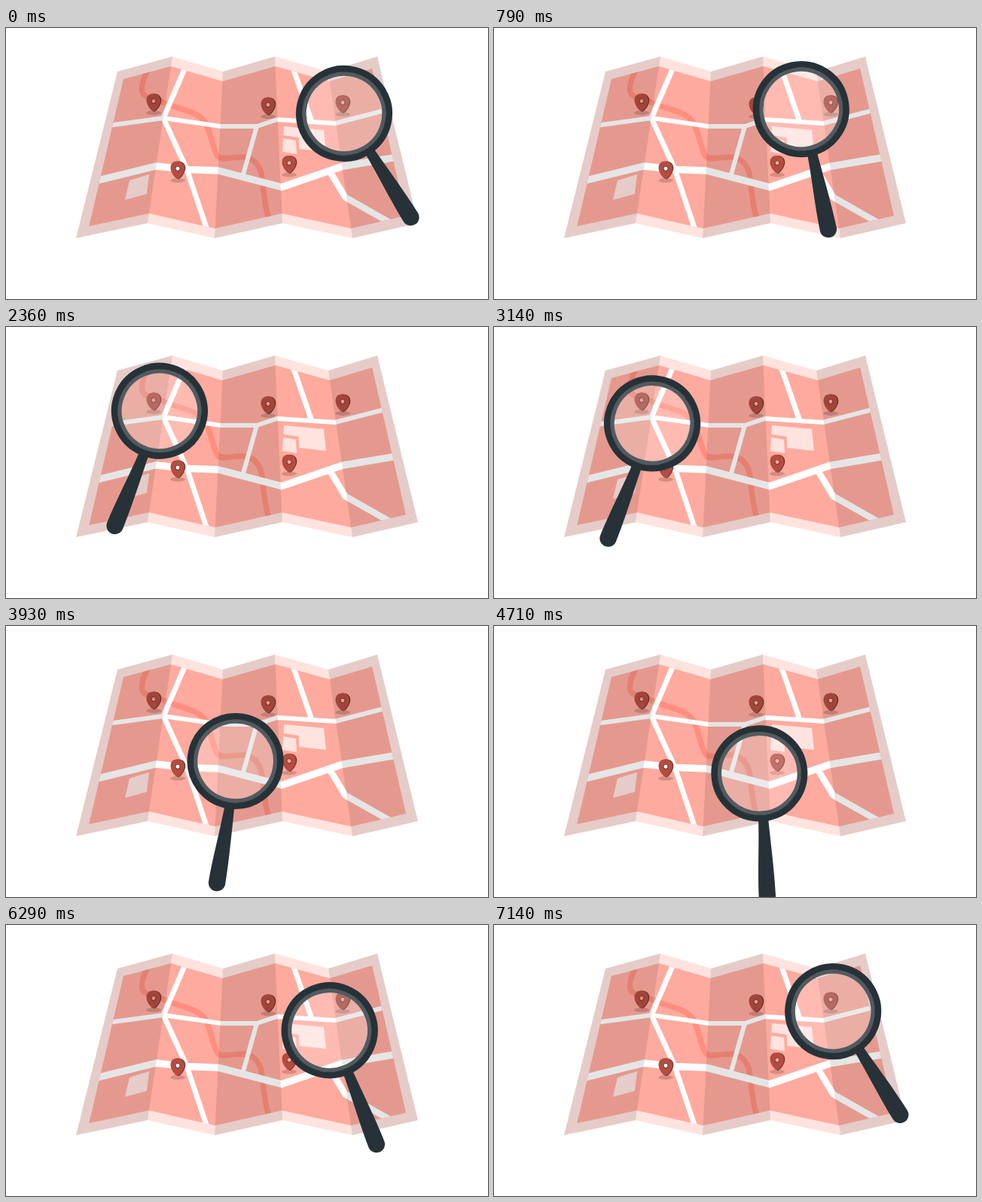
These frames come from a looping animation (640x361 px, 7.21 s). An HTML page:

```html
<!DOCTYPE html>
<html lang="en">
<head>
<meta charset="utf-8">
<title>Map search</title>
<style>
  html, body { margin: 0; width: 100%; height: 100%; overflow: hidden; background: #fff; }
  svg { display: block; width: 100%; height: 100%; }
  .road { fill: none; stroke: #fff; stroke-linejoin: round; }
</style>
</head>
<body>
<svg viewBox="0 0 640 361">
  <defs>
    <clipPath id="printed"><path id="inner"/></clipPath>
    <g id="pin">
      <ellipse cy="1.500" rx="10" ry="3" fill="#000" opacity=".17"/>
      <path fill="#742f27" fill-rule="evenodd" d="M1 0C-3 -2 -8.500 -9 -8.500 -15C-8.500 -21 -5 -24 .8 -24C7 -24 10.300 -20 10.300 -15C10.300 -9 5 -2 1 0ZM0 -16.800a2.500 2.600 0 1 0 .01 0Z"/>
      <path fill="#b34d41" fill-rule="evenodd" d="M-.5 -.5C-4 -2 -9.500 -9 -9.500 -15C-9.500 -21 -6 -24 -.2 -24C5.500 -24 9 -20 9 -15C9 -9 4 -2 -.5 -.5ZM0 -17.600a3.400 3.600 0 1 0 .01 0Z"/>
    </g>
  </defs>

  <path id="sheet" fill="#ffe3df"/>
  <use href="#inner" fill="#ffaa9e"/>

  <g clip-path="url(#printed)">
    <path fill="none" stroke="#ff8e7e" stroke-width="7.500" d="M189 54C183 66 179 78 181 85C183 94 196 92 207 98C226 108 254 110 264 125C273 140 273 158 281 171C287 177 302 171 316 172C332 174 338 186 340 199C342 216 343 239 350 256"/>
    <path fill="#ffe3df" d="M164 203 190 195 187 221 158 229ZM369 131 422 136 425 165 389.500 161 388.500 146 368.500 143ZM368 147 385 150 386 168 367 165Z"/>
    <g class="road">
      <path stroke-width="6" d="M135 130 209 120 285 131H333L360 122 437 127 506 109M333 131 315 195"/>
      <path stroke-width="7" d="M239 50 209 120 240 188 268 272M380 50 406 125"/>
      <path stroke-width="9.500" d="M118 204 199 184 241 188.500 282 190 366 212 446 184.500 520 172"/>
      <path stroke-width="8.500" d="M431 193 450.500 225.500 513 261"/>
    </g>
  </g>

  <use href="#pin" x="196" y="111.500"/>
  <use href="#pin" x="348" y="116.500"/>
  <use href="#pin" x="447" y="113.500"/>
  <use href="#pin" x="228" y="201.500"/>
  <use href="#pin" x="376" y="194"/>

  <path id="shade" opacity=".1"/>

  <g id="glass">
    <circle r="51" fill="#fff" opacity=".2"/>
    <circle r="53" fill="none" stroke="#515b60" stroke-width="5.500"/>
    <path fill="#263238" d="M-4.500 60H8.500C10 90 13 130 13 164A11.200 11.200 0 0 1 -9.400 164C-9.400 135 -5 90 -4.500 60Z"/>
    <circle r="59.700" fill="none" stroke="#263238" stroke-width="8.600"/>
  </g>
</svg>
<script>
const byId = id => document.getElementById(id);
const mix = (a, b, k) => a + (b - a) * k;

// The sheet is a zigzag of folds; u counts folds from the left, v runs from top to bottom.
const foldTop = [148, 221, 288, 357, 428, 493];
const foldBottom = [93, 188, 277, 367, 460, 547];

function onSheet(u, v) {
  const i = Math.min(Math.floor(u), 4), k = u - i;
  const x = mix(mix(foldTop[i], foldTop[i + 1], k), mix(foldBottom[i], foldBottom[i + 1], k), v);
  const zigzag = 20 * (i % 2 ? k : 1 - k);
  return `${x} ${38 + zigzag + 222 * v}`;
}

function strip(us, inset = 0) {
  const top = us.map(u => onSheet(u, inset));
  const bottom = us.map(u => onSheet(u, 1 - inset)).reverse();
  return `M${[...top, ...bottom].join('L')}Z`;
}

byId('sheet').setAttribute('d', strip([0, 1, 2, 3, 4, 5]));
byId('inner').setAttribute('d', strip([0.15, 1, 2, 3, 4, 4.85], 0.058));
byId('shade').setAttribute('d', [0, 2, 4].map(i => strip([i, i + 1])).join(''));

// Evenly timed poses of the glass: lens x, lens y, tilt in degrees
const LOOP = 7210;
const poses = [
  [449, 114, 32], [406.5, 108, 11.8], [248, 104, -13.6],
  [203, 112.5, -22], [214, 131, -21], [312, 183.5, -8],
  [355.5, 197, 4.5], [362.5, 194.3, 16.3], [438, 133, 22.7],
];

// Closed Catmull-Rom curve through the poses
function poseAt(time) {
  const n = poses.length, place = time / LOOP * n;
  const i = Math.floor(place), k = place - i;
  const [before, from, to, after] = [-1, 0, 1, 2].map(step => poses[(i + step + n) % n]);
  return from.map((a, j) => {
    const b = to[j], start = (b - before[j]) / 2, end = (after[j] - a) / 2;
    return mix(a, b, k * k * (3 - 2 * k)) + k * (1 - k) * (start * (1 - k) - end * k);
  });
}

function draw() {
  const [x, y, tilt] = poseAt(performance.now() % LOOP);
  byId('glass').setAttribute('transform', `translate(${x} ${y}) rotate(${-tilt})`);
  requestAnimationFrame(draw);
}
draw();
</script>
</body>
</html>
```
